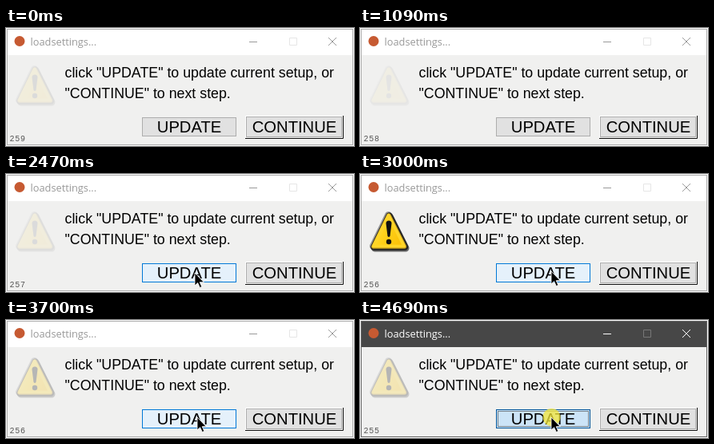
Animation of 435 by 148 pixels, one loop 4.79 s. Source, as an HTML page:

```html
<!DOCTYPE html>
<html lang="en">
<head>
<meta charset="utf-8">
<title>loadsettings</title>
<style>
  html, body { margin: 0; width: 100%; height: 100%; overflow: hidden; background: #fff; }
  svg { display: block; width: 435px; height: 148px; }
  text { font-kerning: none; white-space: pre; }
  .title { font: 12.8px "Open Sans", "Noto Sans", sans-serif; fill: #999; }
  .message { font: 17.8px "Liberation Sans", Arial, sans-serif; }
  .label { font: 20.2px "Liberation Sans", Arial, sans-serif; text-anchor: middle; }
  .count { font: 10px "Liberation Mono", "Courier New", monospace; letter-spacing: .8px; fill: #555; }
  .frame { fill: none; stroke: #ababab; }
  .bar { fill: #fff; }
  .controls { fill: none; stroke: #999; }
  .disabled { fill: none; stroke: #e6e6e6; }
  .button { fill: #e1e1e1; stroke: #adadad; }
  .hover .button { fill: #e5f1fb; stroke: #0078d7; }
  .pressed .button { fill: #cce4f7; stroke: #005499; }
  .focus { fill: none; stroke: #222; stroke-dasharray: 1 1; visibility: hidden; }
  .pressed .focus { visibility: visible; }
  .active .bar { fill: #474747; }
  .active .frame { stroke: #626262; }
  .active .title { fill: #fff; }
  .active .controls { stroke: #fff; }
  .active .disabled { stroke: #777; }
</style>
</head>
<body>
<svg viewBox="0 0 435 148">
  <defs>
    <linearGradient id="gold" x1="0" x2="1" y1="0" y2=".5">
      <stop offset="0" stop-color="#ffe45c"/>
      <stop offset=".5" stop-color="#ffd21c"/>
      <stop offset="1" stop-color="#fbc30a"/>
    </linearGradient>
    <path id="tri" d="M36 52L17 91H55.500Z" stroke-linejoin="round"/>
  </defs>

  <g id="window">
    <rect x="1" y="1" width="433" height="146" fill="#f0f0ef"/>
    <rect class="bar" x="1" y="1" width="433" height="33"/>
    <rect class="frame" x="1.500" y="1.500" width="432" height="145"/>
    <circle cx="17" cy="16.500" r="6.500" fill="#c65a32"/>
    <text class="title" x="30.500" y="22">loadsettings...</text>
    <path class="controls" d="M304 17.500h10M403 12l10 10M413 12l-10 10"/>
    <path class="disabled" d="M354.500 12.500h9v9h-9z"/>
  </g>

  <g id="warning">
    <use href="#tri" x="1.500" y="2" fill="#666" stroke="#666" stroke-width="9"/>
    <use href="#tri" x="-.5" y="-.5" fill="#999" stroke="#999" stroke-width="9"/>
    <use href="#tri" x=".5" y=".5" fill="#222" stroke="#222" stroke-width="8.500"/>
    <use href="#tri" fill="#b8921a" stroke="#b8921a" stroke-width="5.500"/>
    <use href="#tri" x="-.3" y="-.3" fill="url(#gold)" stroke="#ffd529" stroke-width="3.800"/>
    <path d="M32.500 62q0-3.500 3.500-3.500t3.500 3.500l-2 16q-1.500 2-3 0z" fill="#111"/>
    <circle cx="36" cy="85" r="3.200" fill="#111"/>
  </g>

  <text class="message" x="73.500" y="62">click "UPDATE" to update current setup, or</text>
  <text class="message" x="73.500" y="88">"CONTINUE" to next step.</text>

  <g id="update">
    <rect class="button" x="170.500" y="112.500" width="117" height="23"/>
    <rect class="focus" x="172.500" y="114.500" width="113" height="19"/>
    <text class="label" x="229" y="131">UPDATE</text>
  </g>

  <path d="M299.500 138V110.500H421" fill="none" stroke="#fff"/>
  <path d="M299 138.500H421.500V110" fill="none" stroke="#111"/>
  <rect class="button" x="300.500" y="111.500" width="119" height="25"/>
  <text class="label" x="360.500" y="131">CONTINUE</text>

  <text class="count" id="count" x="4.500" y="142">259</text>

  <circle id="click" cx="239.500" cy="122" r="11" fill="#f5e83a" fill-opacity=".75"/>
  <path id="cursor" d="M0 0V16L3.700 12.600 6.300 18.500 8.800 17.400 6.200 11.700H11.300Z"
        fill="#000" stroke="#fff" stroke-width=".8"/>
</svg>

<script>
const LOOP = 4790, STEP = LOOP / 35;
const ENTER_AT = 2050, HOVER_AT = 2180, PRESS_AT = 4480;

// Key points: [ms, value...], eased from one to the next.
const glow = [[0, .09], [530, 1], [1160, .02], [1800, 1], [2400, .06],
              [3000, 1], [3520, .12], [4200, 1], [LOOP, .15]];
const path = [[ENTER_AT, 256, 135], [2310, 235, 125], [2740, 239, 122]];

const el = id => document.getElementById(id);
const [win, warning, update, count, click, cursor] =
  ["window", "warning", "update", "count", "click", "cursor"].map(el);

const show = (node, on) => node.setAttribute("visibility", on ? "visible" : "hidden");

function ease(keys, t) {
  const next = keys.findIndex(key => key[0] > t);
  if (next < 1) return keys.at(next).slice(1);
  const [t0, ...from] = keys[next - 1];
  const [t1, ...to] = keys[next];
  const k = (1 - Math.cos(Math.PI * (t - t0) / (t1 - t0))) / 2;
  return from.map((v, i) => v + (to[i] - v) * k);
}

function draw(time) {
  const t = Math.floor(time / STEP + .25) * STEP; // the picture refreshes in even steps
  const pressed = t >= PRESS_AT;
  const [x, y] = ease(path, t).map(Math.round);
  warning.setAttribute("opacity", ease(glow, t)[0]);
  count.textContent = 259 - Math.floor((t + 60) / 1000);
  cursor.setAttribute("transform", `translate(${x} ${y})`);
  show(cursor, t >= ENTER_AT);
  show(click, pressed);
  win.classList.toggle("active", pressed);
  update.classList.toggle("hover", t >= HOVER_AT);
  update.classList.toggle("pressed", pressed);
}

const start = performance.now();
function tick() {
  draw((performance.now() - start) % LOOP);
  requestAnimationFrame(tick);
}
tick();
</script>
</body>
</html>
```
